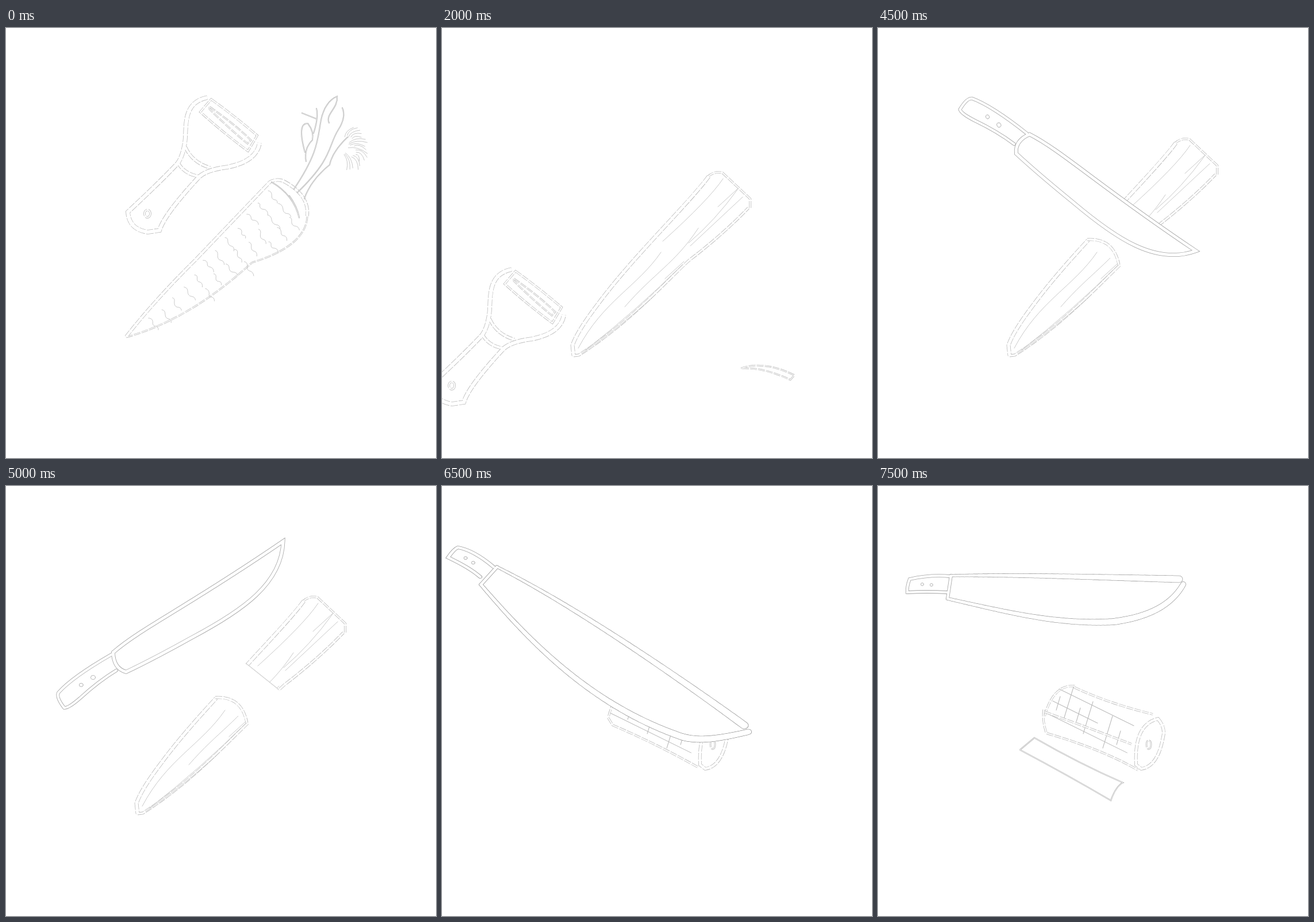
An HTML page with a canvas that plays this animation: 748x748 px, repeating every 8 s.

```html
<!DOCTYPE html>
<html lang="en">
<head>
<meta charset="utf-8">
<title>Cutting a carrot</title>
<style>
html, body { margin: 0; height: 100%; overflow: hidden; background: #fff; }
canvas { display: block; width: 100vw; height: 100vh; }
</style>
</head>
<body>
<canvas width="748" height="748"></canvas>
<script>
const ctx = document.querySelector('canvas').getContext('2d');
const LOOP = 8000, EDGE = .8;
const PALE = '#bcbcbc', DARK = '#a4a4a4';

let seed = 7;
const random = () => (seed = seed * 16807 % 2147483647) / 2147483647;
const between = (low, high) => low + (high - low) * random();

// A pen stroke is white with two grey edges, `width` apart; a hairline has width 0.
const pen = (width, ...paths) => paths.map(d => ({ width, path: new Path2D(d) }));

function oval(x, y, rx, ry = rx, width = 0) {
  const path = new Path2D();
  path.ellipse(x, y, rx, ry, 0, 0, 7);
  return { width, path };
}

function bezier([a, b, c, d], t) {
  const s = 1 - t;
  return [0, 1].map(i =>
    s * s * s * a[i] + 3 * s * s * t * b[i] + 3 * s * t * t * c[i] + t * t * t * d[i]);
}

// A pen stroke whose width changes along a cubic curve.
function taper(points, from, to) {
  const steps = 40;
  return Array.from({ length: steps }, (_, i) => pen(from + (to - from) * i / steps,
    `M${bezier(points, i / steps)}L${bezier(points, (i + 1) / steps)}`)[0]);
}

function ink(strokes, color = PALE, dash = []) {
  ctx.lineCap = dash.length ? 'butt' : 'round';
  ctx.strokeStyle = color;
  ctx.setLineDash(dash);
  for (const { width, path } of strokes) { ctx.lineWidth = width + EDGE; ctx.stroke(path); }
  ctx.setLineDash([]);
  ctx.strokeStyle = '#fff';
  for (const { width, path } of strokes) {
    if (width > EDGE) { ctx.lineWidth = width - EDGE; ctx.stroke(path); }
  }
}

const sketch = strokes => ink(strokes, PALE, [12, 2]);

function placed(transform, draw) {
  ctx.save();
  transform();
  draw();
  ctx.restore();
}

function fillWhite(path) {
  ctx.fillStyle = '#fff';
  ctx.fill(path);
}

// Peeler
const peelerParts = [
  ...pen(7, 'M350 121C305 130 315 175 311 200Q307 225 298 236Q270 266 212 320Q214 350 246 355L267 352Q275 325 333 262Q345 247 385 242Q436 232 441 200'),
  ...pen(5, 'M312 207Q324 234 355 243', 'M299 234Q310 254 335 258'),
  ...pen(3, 'M357 124Q400 155 437 187L421 214Q375 180 338 146Z'),
  ...pen(2, 'M354 137Q395 165 426 195L420 201Q385 172 354 141Z'),
  oval(246, 323, 5, 6.5, 3)
];
const peeler = (dx, dy) => placed(() => ctx.translate(dx, dy), () => sketch(peelerParts));

// Whole carrot
const carrotSkin = [
  ...pen(5, 'M209 537Q260 472 330 403L459 268Q470 262 482 266Q528 290 524 327'),
  ...pen(2, 'M209 538C290 515 360 470 428 408C470 395 527 370 524 322')
];

// Wavy wrinkles in rows across the skin, from the tip to the crown.
function wrinkles() {
  let d = '';
  for (let t = .14; t < .98; t += .075) {
    const span = 98 * t ** .55;
    for (let across = between(6, 16); across < span - 14; across += between(26, 34)) {
      let x = 209 + 250 * t + .62 * across, y = 538 - 272 * t + .78 * across;
      d += `M${x} ${y}`;
      for (let k = 0; k < 3; k++) {
        const bend = k % 2 ? 3 : -3;
        const nx = x + between(3, 8), ny = y + between(5, 9);
        d += `Q${(x + nx) / 2 - bend} ${(y + ny) / 2 + bend} ${nx} ${ny}`;
        x = nx; y = ny;
      }
    }
  }
  return d;
}

// Short curved fronds that point away from a centre, between two angles.
function fronds(cx, cy, first, last, count) {
  let d = '';
  for (let i = 0; i < count; i++) {
    const angle = first + (last - first) * i / (count - 1);
    const inner = between(12, 30), outer = between(40, 50);
    const at = (r, a) => `${cx + r * Math.cos(a)} ${cy + r * Math.sin(a)}`;
    d += `M${at(inner, angle - .1)}Q${at((inner + outer) / 2, angle - .2)} ${at(outer, angle + .1)}`;
  }
  return d;
}

const carrotDetails = [
  ...pen(1.4, 'M462 268Q500 290 510 330', 'M493 292Q506 310 510 329'),
  ...pen(0, wrinkles(), fronds(582, 208, -1.1, 1.2, 18)),
  ...pen(1.4,
    'M501 280C545 215 542 190 548 160Q555 128 576 119C578 140 555 150 562 165',
    'M507 286C570 225 560 205 578 177Q592 155 585 139',
    'M519 297Q530 265 563 238Q568 215 594 190',
    'M522 232Q518 210 533 195Q536 180 525 166Q506 165 520 216',
    'M540 140Q544 155 535 183', 'M515 148L540 158')
];

function rawCarrot() {
  sketch(carrotSkin);
  ink(carrotDetails);
}

// Peeled carrot
const peeledSkin = [
  ...pen(6, 'M464 258C430 305 330 400 270 482Q235 528 227 552L229 570'),
  ...pen(4, 'M229 570L238 569C330 510 390 440 430 404Q490 358 533 313'),
  ...pen(3, 'M462 259Q474 248 488 252L536 297V313')
];
const grain = pen(0,
  'M489 262Q465 298 384 371', 'M515 279L480 311', 'M514 281Q475 335 429 374',
  'M523 294L432 379', 'M446 348C405 410 370 425 318 485',
  'M381 390C340 450 280 475 237 557', 'M421 406L388 436',
  'M365 470Q300 528 243 566', 'M418 412Q340 490 250 560');

function peeledCarrot() {
  sketch(peeledSkin);
  ink(grain);
}

// The lower half stays; the upper half has slid away from the cut.
function cutCarrot() {
  const cut = 'M0 77L748 675';
  const half = side => { ctx.clip(new Path2D(cut + side)); peeledCarrot(); };
  placed(() => {}, () => half('V748H0Z'));
  sketch(pen(4, 'M364 368Q410 365 419 412'));
  placed(() => ctx.translate(54, -58), () => {
    half('V0H0Z');
    ink(pen(2, 'M364 368L419 412'));
  });
}

const motionArcs = pen(1, 'M198 63Q218 82 227 100', 'M391 41Q394 32 409 25',
  'M556 121Q577 122 594 133', 'M179 336Q190 343 194 357');
const peeling = pen(2, 'M520 592Q560 578 613 604L606 612Q560 590 520 592');

// Knife with even outlines
const blade = 'M204 240C250 196 330 155 491 34C492 108 425 158 340 208Q275 248 228 273Q206 268 204 240';
const handle = 'M201 244C160 270 130 292 112 314Q108 322 123 340Q130 341 150 322C170 302 190 285 211 271';
const knifeParts = [...pen(6, blade), ...pen(5, handle), oval(151, 299, 3.5, 3), oval(171, 285, 4, 3.5)];

function knife(x = 127, y = 342, degrees = 0) {
  placed(() => {
    ctx.translate(x, y);
    ctx.rotate(degrees * Math.PI / 180);
    ctx.translate(-127, -342);
  }, () => {
    fillWhite(new Path2D(blade));
    ink(knifeParts, DARK);
  });
}
const raisedKnife = () => knife(105, 388, 2.5);

// Knife close up: its outlines swell towards the tip
function closeKnife({ spine, belly, tip, grip, holes }) {
  const outline = new Path2D(`M${spine[0]}C${spine.slice(1)}L${tip[3]}C${tip[2]},${tip[1]},${tip[0]}C${belly[2]},${belly[1]},${belly[0]}Z`);
  const strokes = [
    ...pen(5, grip, `M${spine[0]}L${belly[0]}`),
    ...taper(spine, 4, 12), ...taper(belly, 5, 11), ...taper(tip, 11, 9),
    ...holes.map(([x, y]) => oval(x, y, 2.5))
  ];
  return () => { fillWhite(outline); ink(strokes, DARK); };
}

const slantedKnife = closeKnife({
  spine: [[163, 188], [260, 245], [400, 355], [518, 457]],
  belly: [[140, 218], [200, 300], [290, 420], [428, 476]],
  tip: [[428, 476], [455, 486], [490, 477], [524, 468]],
  grip: 'M158 188Q130 160 107 155Q101 158 93 172Q125 190 139 205',
  holes: [[118, 173], [129, 181]]
});
const flatKnife = closeKnife({
  spine: [[127, 156], [230, 154], [360, 158], [524, 162]],
  belly: [[121, 196], [220, 218], [310, 242], [410, 236]],
  tip: [[410, 236], [470, 228], [510, 208], [531, 171]],
  grip: 'M126 157Q90 154 55 162Q50 175 51 185Q85 183 120 185',
  holes: [[77, 171], [93, 172]]
});

// Carrot block and slice
const endFace = [
  ...pen(5, 'M487 405Q500 420 496 436Q487 488 458 492L449 485Q445 415 487 405Z'),
  oval(471, 450, 4, 7.5, 2)
];
const blockTop = pen(3, 'M341 350Q400 378 478 397', 'M290 400Q305 345 342 348');
const blockBase = pen(3, 'M289 403L297 416Q370 447 445 489');
const domeTop = pen(3, 'M289 403C295 340 330 305 360 318Q495 365 500 420');
const slicedSide = pen(3, 'M290 393Q365 420 441 449', 'M288 389Q286 410 293 430Q390 458 452 494');
const slice = pen(1.6, 'M247 459L272 438Q350 483 426 516Q414 522 405 547Q330 503 247 459');

function gridLines() {
  const along = [1, .6, 1.08].map((length, row) =>
    `M${315 - 11 * row} ${353 + 21 * row}l${130 * length} ${64 * length}`);
  const across = [0, 1, 2].map(i => `M${340 + 34 * i} ${350 + 25 * i}l-17 56`);
  const ticks = [0, 1, 3].map(i => `M${317 + 35 * i} ${366 + 20 * i}l-7 24`);
  return pen(.3, ...along, ...across, ...ticks);
}
const grid = gridLines();

function block() {
  sketch([...blockTop, ...blockBase, ...endFace]);
  ink(grid);
}

function slicedBlock() {
  sketch([...blockTop, ...endFace]);
  ink(grid);
  sketch(slicedSide);
}

const scenes = [
  [0, () => { rawCarrot(); peeler(0, 0); }],
  [500, () => { rawCarrot(); peeler(-91, 98); }],
  [1000, () => { rawCarrot(); peeler(-229, 299); }],
  [2000, () => { peeledCarrot(); sketch(peeling); peeler(-229, 299); }],
  [3000, () => { peeledCarrot(); ink(motionArcs); knife(); }],
  [4000, () => { peeledCarrot(); knife(); }],
  [4500, () => { cutCarrot(); knife(142, 146, 70.7); }],
  [5000, () => { cutCarrot(); raisedKnife(); }],
  [5500, () => { sketch([...domeTop, ...blockBase, ...endFace]); raisedKnife(); }],
  [6000, () => { block(); raisedKnife(); }],
  [6500, () => {
    block();
    placed(() => { ctx.translate(-102, -52); ctx.scale(1.212, 1.025); }, slantedKnife);
  }],
  [7000, () => { block(); ink(slice); slantedKnife(); }],
  [7500, () => { slicedBlock(); ink(slice); flatKnife(); }]
];

const start = performance.now();
function frame() {
  const t = (performance.now() - start) % LOOP;
  ctx.clearRect(0, 0, 748, 748);
  scenes.findLast(([from]) => t >= from)[1]();
  requestAnimationFrame(frame);
}
frame();
</script>
</body>
</html>
```
